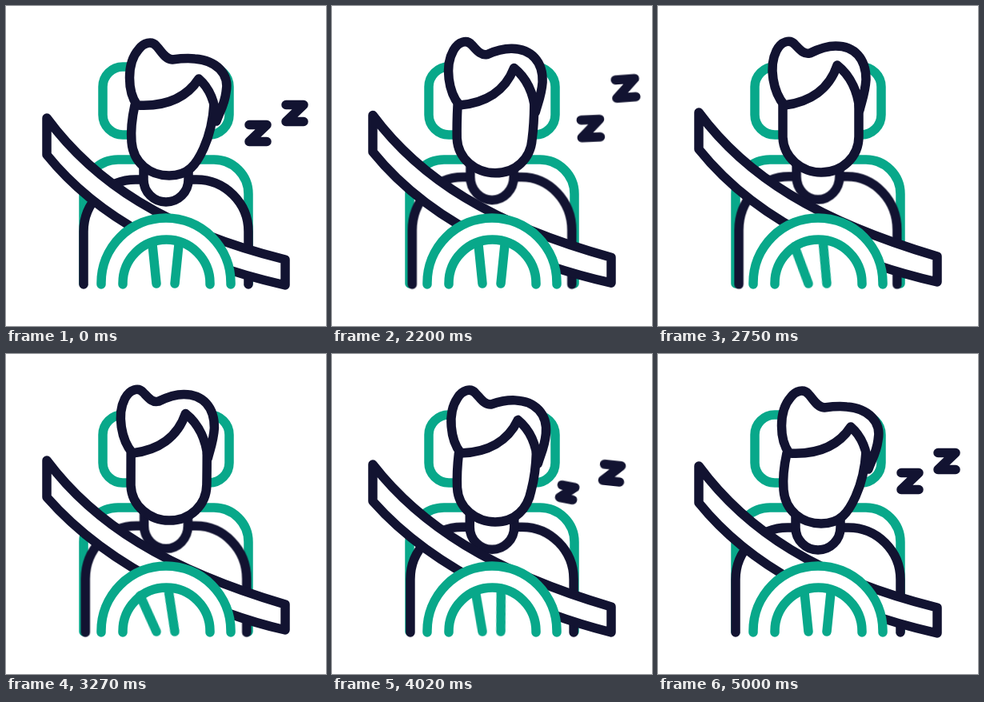
These frames come from a looping animation (400 px wide and 400 px high, 5020 ms). An HTML page:

```html
<!DOCTYPE html>
<html lang="en">
<head>
<meta charset="utf-8">
<title>Drowsy driver</title>
<style>
html, body { margin: 0; width: 100%; height: 100%; overflow: hidden; background: #fff; }
svg { display: block; width: 100vw; height: 100vh; }
path {
  fill: #fff; stroke: #121331; stroke-width: 11.5;
  stroke-linecap: round; stroke-linejoin: round;
  vector-effect: non-scaling-stroke;
}
.green path { stroke: #08a88a; }
.line { fill: none; }

.hair, .face, .belt, .torso, .spoke, .z { animation: 5020ms linear infinite; }
.hair { animation-name: hair; }
.face { animation-name: face; }
.belt { animation-name: belt; }
.torso { animation-name: breathe; transform-origin: 200px 348px; }
.left { animation-name: steer-left; transform-origin: 188px 347px; }
.right { animation-name: steer-right; transform-origin: 211px 347px; }
.near { animation-name: near; }
.far { animation-name: far; }

/* Head: quick wake-up, then a slow nod back */
@keyframes hair {
  0%, 39.94%, 99.6%, 100% {
    d: path("M164 124C152 108 150 72 166 54C172 46 182 43 188 50C194 56 198 66 208 67C216 66 226 65 236 66C262 68 280 84 275 108C273 124 267 132 263 144C262 124 256 104 241 91C226 114 200 126 164 124Z");
    animation-timing-function: cubic-bezier(.3, .1, .3, 1);
  }
  47.4%, 61% {
    d: path("M158 124C144 108 138 76 148 56C154 44 165 41 171 48C177 54 182 61 190 59C200 54 212 50 222 50C246 50 260 66 260 92C259 108 255 118 252 130C250 110 242 88 224 74C214 104 190 120 158 124Z");
    animation-timing-function: cubic-bezier(.37, 0, .63, 1);
  }
}
@keyframes face {
  0%, 39.94%, 99.6%, 100% {
    d: path("M161 124C157 142 156 158 157 170C159 196 180 212 204 212C228 212 238 198 247 178C256 158 259 140 260 122");
    animation-timing-function: cubic-bezier(.3, .1, .3, 1);
  }
  47.4%, 61% {
    d: path("M156 124C156 140 156 152 156 164C157 190 180 208 204 208C230 208 251 189 251 163C251 150 251 138 251 124");
    animation-timing-function: cubic-bezier(.37, 0, .63, 1);
  }
}
@keyframes breathe {
  0%, 39.94%, 99.6%, 100% { transform: scale(1, 1); animation-timing-function: cubic-bezier(.3, .1, .3, 1); }
  47.4% { transform: scale(.96, 1.03); }
  57% { transform: scale(.96, 1.03); animation-timing-function: ease-in; }
  65.14% { transform: scale(.978, 1.016); }
  80.08% { transform: scale(.991, 1.006); animation-timing-function: ease-out; }
}
@keyframes belt {
  0%, 39.94%, 99.6%, 100% {
    d: path("M51 140C110 220 200 280 349 317V349C270 331 135 290 51 186Z");
    animation-timing-function: cubic-bezier(.3, .1, .4, 1);
  }
  47.81% { d: path("M51 135C110 214 200 270 349 313V345C270 327 135 285 51 181Z"); }
  54.78% { d: path("M51 133C110 213 200 269 349 313V345C270 327 135 284 51 179Z"); }
  65.14% {
    d: path("M51 133C110 212 200 269 349 313V345C270 327 135 275 51 179Z");
    animation-timing-function: ease-in-out;
  }
  80.08% {
    d: path("M51 138C110 214 200 272 349 316V348C270 328 135 279 51 184Z");
    animation-timing-function: ease-out;
  }
}

@keyframes steer-left {
  0%, 46.5%, 99.6%, 100% { transform: rotate(0deg); animation-timing-function: ease-in-out; }
  54.78% { transform: rotate(-14.5deg); animation-timing-function: ease-out; }
  65.14% { transform: rotate(-18.5deg); animation-timing-function: ease-in-out; }
  80.08% { transform: rotate(-4deg); animation-timing-function: ease-out; }
}
@keyframes steer-right {
  0%, 46.5%, 99.6%, 100% { transform: rotate(0deg); animation-timing-function: ease-in-out; }
  54.78% { transform: rotate(-11deg); animation-timing-function: ease-out; }
  65.14% { transform: rotate(-14.5deg); animation-timing-function: ease-in-out; }
  80.08% { transform: rotate(-5.5deg); animation-timing-function: ease-out; }
}

/* Letters float off, then fresh ones rise from the mouth */
@keyframes near {
  0%, 39.94%, 94%, 100% {
    transform: translate(315px, 159px) rotate(0deg) scale(1); opacity: 1;
    animation-timing-function: ease-in;
  }
  47.81% { transform: translate(342px, 140px) rotate(-8deg) scale(1.17); opacity: 1; }
  50.1% { transform: translate(362px, 115px) rotate(-12deg) scale(1.25); opacity: 1; }
  50.11% { transform: translate(362px, 115px) rotate(-12deg) scale(1.25); opacity: 0; }
  74.5% { transform: translate(272px, 190px) rotate(20deg) scale(.2); opacity: 0; }
  74.51% { transform: translate(272px, 190px) rotate(20deg) scale(.2); opacity: 1; }
  80.08% {
    transform: translate(294px, 173px) rotate(11deg) scale(.75); opacity: 1;
    animation-timing-function: ease-out;
  }
}
@keyframes far {
  0%, 39.94%, 94%, 100% {
    transform: translate(361px, 134px) rotate(0deg) scale(1); opacity: 1;
    animation-timing-function: ease-in;
  }
  47.2% { transform: translate(378px, 47px) rotate(-12deg) scale(1.25); opacity: 1; }
  47.21% { transform: translate(378px, 47px) rotate(-12deg) scale(1.25); opacity: 0; }
  67.7% { transform: translate(272px, 190px) rotate(20deg) scale(.2); opacity: 0; }
  67.71% {
    transform: translate(272px, 190px) rotate(20deg) scale(.2); opacity: 1;
    animation-timing-function: ease-out;
  }
  80.08% {
    transform: translate(350px, 149px) rotate(6deg) scale(.96); opacity: 1;
    animation-timing-function: ease-out;
  }
}
</style>
</head>
<body>
<svg viewBox="0 0 400 400">
  <g class="green">
    <path d="M146 76H254A25 25 0 0 1 279 101V136A25 25 0 0 1 254 161H146A25 25 0 0 1 121 136V101A25 25 0 0 1 146 76Z"/>
    <path d="M97 347V235A43 43 0 0 1 140 192H260A43 43 0 0 1 303 235V347"/>
  </g>
  <g class="torso">
    <path d="M97 348V282A65 65 0 0 1 162 217H238A65 65 0 0 1 303 282V348"/>
    <path d="M172 200V217A28 28 0 0 0 228 217V200"/>
  </g>
  <path class="face" d="M161 124C157 142 156 158 157 170C159 196 180 212 204 212C228 212 238 198 247 178C256 158 259 140 260 122"/>
  <path class="hair" d="M164 124C152 108 150 72 166 54C172 46 182 43 188 50C194 56 198 66 208 67C216 66 226 65 236 66C262 68 280 84 275 108C273 124 267 132 263 144C262 124 256 104 241 91C226 114 200 126 164 124Z"/>
  <path class="belt" d="M51 140C110 220 200 280 349 317V349C270 331 135 290 51 186Z"/>
  <g class="green">
    <path d="M119 348V346A81 81 0 0 1 281 346V348"/>
    <path class="spoke left" d="M183 298L188 347"/>
    <path class="spoke right" d="M216 298L211 347"/>
    <path class="line" d="M146 348V346.500A54.500 54.500 0 0 1 255 346.500V348"/>
  </g>
  <path class="z near line" d="M-11 -10.500H11L-11 10.500H11"/>
  <path class="z far line" d="M-11 -10.500H11L-11 10.500H11"/>
</svg>
</body>
</html>
```
